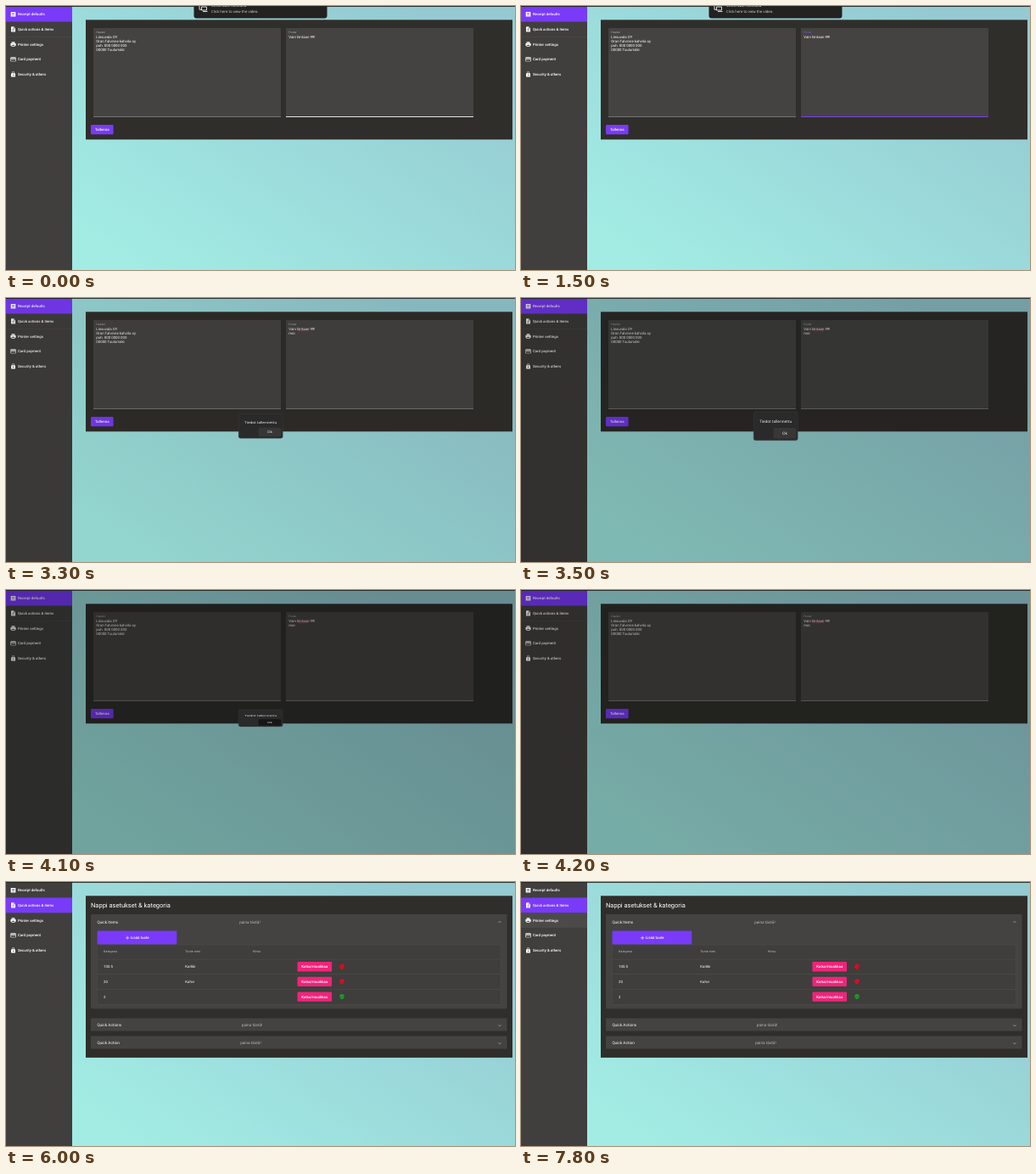
These frames come from a looping animation (600 px wide and 311 px high, 8 s). An HTML page:

```html
<!DOCTYPE html>
<html lang="fi">
<head>
<meta charset="utf-8">
<title>Receipt settings</title>
<style>
  html, body { margin: 0; width: 100%; height: 100%; overflow: hidden; background: #333; }
  svg { display: block; width: 100%; height: 100%; }
  text { font: 4.375px Roboto, sans-serif; fill: #fff; white-space: pre; text-rendering: geometricPrecision; }
  .medium { font-weight: 500; }
  .label { font-size: 3.28px; fill: #b4b4b2; }
  .title { font-size: 7.5px; }
  .head { font-size: 4.69px; }
  .muted { fill: #b9b9b7; }
  .column { font-size: 3.75px; fill: #bdbdbb; }
  .system { font-family: "Open Sans", sans-serif; }
  .middle { text-anchor: middle; }
</style>
</head>
<body>
<svg id="stage" viewBox="0 0 600 311" preserveAspectRatio="none"></svg>
<script>
const PURPLE = '#7a3afa', PINK = '#f0247b', CARD = '#444341', LINE = '#555452';
const LOOP = 8000;

const rect = (x, y, w, h, fill, extra = '') =>
  `<rect x="${x}" y="${y}" width="${w}" height="${h}" fill="${fill}" ${extra}/>`;
const text = (x, y, content, style = '', extra = '') =>
  `<text x="${x}" y="${y}" class="${style}" ${extra}>${content}</text>`;
const icon = (x, y, d, fill = '#fff', size = 7.5) =>
  `<path transform="translate(${x - size / 2} ${y - size / 2}) scale(${size / 24})" d="${d}" fill="${fill}" fill-rule="evenodd"/>`;
const stroke = (d, color, width, extra = '') =>
  `<path d="${d}" fill="none" stroke="${color}" stroke-width="${width}" ${extra}/>`;
const group = (id, content) => `<g id="${id}">${content}</g>`;

const ICONS = {
  receipt: 'M3 3h18v18H3zM7 7h10v2H7zM7 11h10v2H7zM7 15h10v2H7z',
  note: 'M14 2H6a2 2 0 0 0-2 2v16a2 2 0 0 0 2 2h12a2 2 0 0 0 2-2V8zM13 9V3.5L18.5 9zM8 12h8v2H8zM8 16h8v2H8z',
  print: 'M19 8H5a3 3 0 0 0-3 3v6h4v4h12v-4h4v-6a3 3 0 0 0-3-3zm-3 11H8v-5h8zM18 3H6v4h12z',
  card: 'M20 4H4a2 2 0 0 0-2 2v12a2 2 0 0 0 2 2h16a2 2 0 0 0 2-2V6a2 2 0 0 0-2-2zm0 14H4v-6h16zm0-10H4V6h16z',
  lock: 'M18 8h-1V6A5 5 0 0 0 7 6v2H6a2 2 0 0 0-2 2v10a2 2 0 0 0 2 2h12a2 2 0 0 0 2-2V10a2 2 0 0 0-2-2zm-6 9a2 2 0 1 1 0-4 2 2 0 0 1 0 4zm3.1-9H8.9V6a3.1 3.1 0 0 1 6.2 0z',
  shield: 'M12 1L3 5v6c0 5.5 3.8 10.7 9 12 5.2-1.3 9-6.5 9-12V5z'
};

const MENU = [
  ['Receipt defaults', 'receipt'], ['Quick actions &amp; items', 'note'],
  ['Printer settings', 'print'], ['Card payment', 'card'], ['Security &amp; others', 'lock']
];
const rowY = i => 9.7 + 17.65 * i;
const rowRect = (i, fill, id) => rect(0, rowY(i) - 8.8, 78, 17.6, fill, `id="${id}"`);

function sidebar() {
  const items = MENU.map(([name, shape], i) =>
    icon(8.5, rowY(i) + .1, ICONS[shape]) + text(13.9, rowY(i) + 1.6, name, 'medium'));
  return rect(0, 0, 78, 311, '#403f3d') + rect(0, 36.2, 78, .4, '#51504e')
    + rowRect(1, '#4a4947', 'hoverQuick') + rowRect(2, '#4a4b49', 'hoverPrinter')
    + rowRect(0, PURPLE, 'activeReceipt') + rowRect(1, PURPLE, 'activeQuick') + items.join('');
}

function field(name, x, label, lines) {
  return rect(x, 26, 221, 105, CARD, 'rx="1"')
    + rect(x, 130.4, 221, .5, '#a2a2a0')
    + rect(x, 130.2, 221, .8, '#fff', `id="${name}Hover"`)
    + rect(x, 130.1, 221, .9, PURPLE, `id="${name}Focus"`)
    + text(x + 3.3, 32, label, 'label', `id="${name}Label"`)
    + lines.map((line, i) => text(x + 3.3, 37.9 + 4.92 * i, line, '', `id="${name}Line${i}"`)).join('');
}

function receiptPage() {
  const squiggle = 'M343 38.8' + 'q.5 -.8 1 0t1 0'.repeat(7);
  return rect(94, 16.3, 503, 141, '#2f2e2b')
    + field('header', 103, 'Header', ['Linsuvala OY', 'Oron Talvinne kahvila oy', 'puh. 000 0000 000', '00000 Tuulumäki'])
    + field('footer', 330, 'Footer', ['Vain hintaan 99!', ''])
    + stroke(squiggle, '#e0404a', .5, 'id="spelling"')
    + rect(100, 140, 26.6, 11.3, PURPLE, 'rx="1.2"')
    + text(113.3, 147.2, 'Tallenna', 'medium middle');
}

function tableRow(y, price, name, allowed) {
  const mark = allowed
    ? icon(396, y, ICONS.shield, '#16a226', 7) + stroke(`M394.3 ${y}l1.2 1.2 2.3-2.3`, CARD, .6)
    : icon(396, y, ICONS.shield, '#e00b25', 7) + stroke(`M393.3 ${y - 2.6}l5.2 5.2`, '#a30c20', .6);
  return text(115, y + 1.6, price) + text(211.3, y + 1.6, name)
    + rect(343.5, y - 5.6, 40.6, 11.3, PINK, 'rx="1.2"')
    + text(363.8, y + 1.6, 'Katso/muokkaa', 'medium middle') + mark;
}

function closedPanel(y, name, hintX) {
  return rect(100, y - 7.4, 490.5, 15, CARD, 'rx="1"')
    + text(107.4, y + 1.7, name, 'head') + text(hintX, y + 1.7, 'paina tästä!', 'head muted')
    + stroke(`M580.4 ${y + .4}l1.5 1.5 1.5-1.5`, '#d0d0ce', .6);
}

function quickPage() {
  return rect(94, 16.3, 503, 190.6, '#2f2e2b')
    + text(100, 30.4, 'Nappi asetukset &amp; kategoria', 'title')
    + rect(100, 38, 490.5, 111.2, CARD, 'rx="1"')
    + text(107.4, 49.4, 'Quick Items', 'head') + text(275.2, 49.4, 'paina tästä!', 'head muted')
    + stroke('M580.4 47.8l1.5-1.5 1.5 1.5', '#d0d0ce', .6)
    + rect(107.6, 57.6, 93.7, 15.8, PURPLE, 'rx="1.2"')
    + stroke('M141 65.8h4.4M143.2 63.6v4.4', '#fff', .6)
    + text(147, 67.3, 'Lisää tuote', 'medium')
    + rect(107.4, 74, 476, 71, '#3f3e3c', `stroke="${LINE}" stroke-width=".3"`)
    + text(115, 83.3, 'Kategoria', 'column') + text(211.3, 83.3, 'Tuote nimi', 'column') + text(290.8, 83.3, 'Hinta', 'column')
    + [90.9, 108.5, 126.2, 144].map(y => rect(107.4, y, 476, .4, LINE)).join('')
    + tableRow(99.7, '100.5', 'Karkki') + tableRow(117.3, '20', 'Kahvi') + tableRow(135.1, '2', '', true)
    + closedPanel(168, 'Quick Actions', 277.8) + closedPanel(189, 'Quick Action', 276.2);
}

function notification() {
  return rect(221.5, -20, 157, 34.4, '#222221', 'rx="3"')
    + stroke('M228 -1v5.2h3M230.5 1h6v4h-6zM232 6.5h5.5', '#eee', .9)
    + text(242, .9, 'Screencast recorded', 'system', 'font-weight="700"')
    + text(242, 8.1, 'Click here to view the video.', 'system', 'style="font-size:4.3px;fill:#dededc"');
}

function dialog() {
  return rect(274.2, 134, 52, 33.8, '#2b2a2a', 'rx="2.5" stroke="#454444" stroke-width=".4"')
    + text(300.2, 147.3, 'Tiedot tallennettu', 'system middle', 'style="font-size:4.6px"')
    + rect(297.6, 153, 26.6, 12.4, '#383736', 'rx="1.6" id="okButton"')
    + text(311, 160.8, 'Ok', 'system middle', 'style="font-size:4.6px"');
}

document.getElementById('stage').innerHTML =
  `<defs><linearGradient id="sky" gradientUnits="userSpaceOnUse" x1="200" y1="340" x2="440" y2="-20">
     <stop offset="0" stop-color="#a2ece4"/><stop offset="1" stop-color="#95cad2"/>
   </linearGradient></defs>`
  + rect(0, 0, 600, 311, 'url(#sky)') + sidebar()
  + group('receiptPage', receiptPage()) + group('quickPage', quickPage())
  + rect(0, 0, 600, 311, '#000', 'id="shade"') + rect(0, 0, 600, .9, '#232323')
  + group('dialog', dialog()) + group('notification', notification());

const part = id => document.getElementById(id);
const fade = (id, amount) => part(id).setAttribute('opacity', amount);
const show = (id, visible) => part(id).setAttribute('visibility', visible ? 'visible' : 'hidden');
const ramp = (t, from, to) => Math.min(1, Math.max(0, (t - from) / (to - from)));
const ease = p => p * p * (3 - 2 * p);
const pulse = (t, inFrom, inTo, outFrom, outTo) => ease(ramp(t, inFrom, inTo)) - ease(ramp(t, outFrom, outTo));

function draw(t) {
  // Footer field: hover, focus and typing
  const focus = pulse(t, 700, 900, 3000, 3150);
  fade('footerHover', 1 - ramp(t, 700, 900));
  fade('footerFocus', focus);
  part('footerLabel').style.fill = focus > .5 ? '#8a55f5' : '';
  part('footerLine1').textContent = 'moi'.slice(0, [1600, 1800, 1950].filter(at => t >= at).length);
  show('spelling', t >= 2400 && t < 4400);
  fade('headerFocus', 0);
  fade('headerHover', pulse(t, 2400, 2550, 2750, 2850));

  part('notification').setAttribute('transform', `translate(0 ${-15 * ease(ramp(t, 1500, 1750))})`);

  // Confirmation dialog
  fade('shade', .31 * (ramp(t, 3150, 3650) - ramp(t, 4150, 4550)));
  const open = ease(ramp(t, 3150, 3350)) * (1 - ramp(t, 4050, 4175));
  show('dialog', open > 0);
  part('dialog').setAttribute('transform', `translate(0 ${151 * (1 - open)}) scale(1 ${open})`);
  part('okButton').setAttribute('fill', t >= 3950 ? '#171616' : '#383736');

  // Navigation
  const quick = t >= 5000;
  show('receiptPage', !quick);
  show('quickPage', quick);
  const active = ramp(t, 4950, 5200);
  fade('activeReceipt', 1 - active);
  fade('activeQuick', active);
  fade('hoverQuick', ramp(t, 4750, 4850));
  fade('hoverPrinter', ramp(t, 7300, 7400));
}

const start = performance.now();
function tick() {
  draw((performance.now() - start) % LOOP);
  requestAnimationFrame(tick);
}
tick();
</script>
</body>
</html>
```
